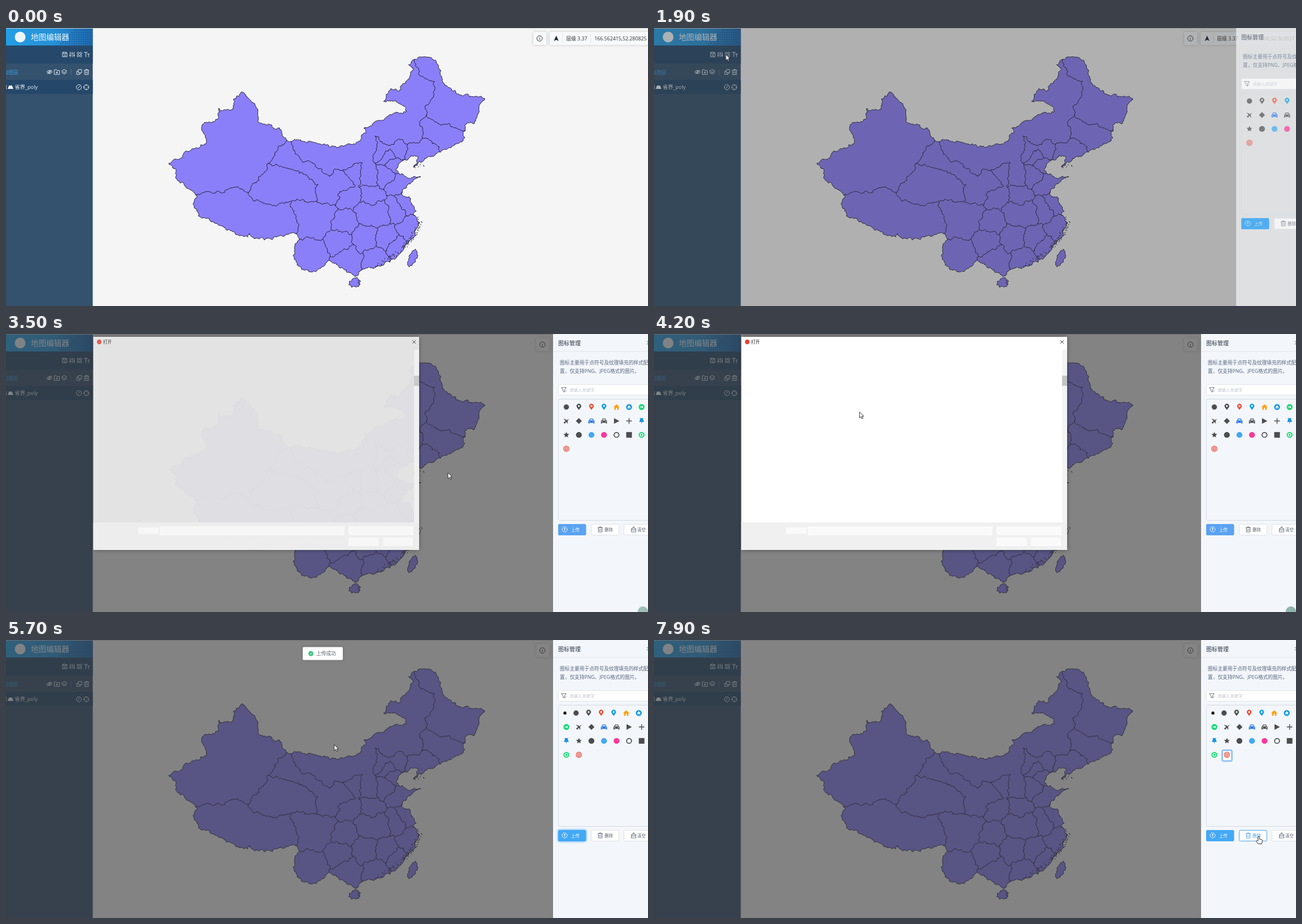
These frames come from a looping animation (1136x493 px, 8000 ms). An HTML page with a canvas:

```html
<!DOCTYPE html>
<html lang="zh">
<head>
<meta charset="utf-8">
<title>地图编辑器</title>
<style>
html, body { margin: 0; width: 100%; height: 100%; overflow: hidden; background: #f5f5f5; }
canvas { display: block; }
</style>
</head>
<body>
<canvas id="stage" width="1136" height="493"></canvas>
<script>
const c = document.getElementById('stage').getContext('2d');
const FONT = '"Open Sans", "Noto Sans CJK SC", "Noto Sans CJK", sans-serif';
const LOOP = 8000;
const ramp = (t, a, b) => Math.max(0, Math.min(1, (t - a) / (b - a)));

// ---- drawing helpers ----
function text(s, x, y, size, color, align = 'left') {
  c.font = `${size}px ${FONT}`;
  c.textAlign = align;
  c.fillStyle = color;
  c.fillText(s, x, y + size * .36);
}
function rect(x, y, w, h, fill, line, r = 0) {
  c.beginPath();
  c.roundRect(x, y, w, h, r);
  if (fill) { c.fillStyle = fill; c.fill(); }
  if (line) { c.strokeStyle = line; c.lineWidth = 1; c.stroke(); }
}
function shadowed(blur, color, draw) {
  c.save();
  c.shadowBlur = blur;
  c.shadowColor = color;
  draw();
  c.restore();
}
function icon(x, y, d, color, width) {
  c.save();
  c.translate(x, y);
  const p = new Path2D(d);
  if (width) { c.strokeStyle = color; c.lineWidth = width; c.stroke(p); }
  else { c.fillStyle = color; c.fill(p, 'evenodd'); }
  c.restore();
}
const ring = (r, x = 0, y = 0) => `M${x + r} ${y}A${r} ${r} 0 1 1 ${x - r} ${y}A${r} ${r} 0 1 1 ${x + r} ${y}Z`;
const rings = (...radii) => radii.map(r => ring(r)).join('');
const cross = 'M-3-3L3 3M3-3L-3 3';
const star = (n, a, b) => 'M' + Array.from({ length: 2 * n }, (_, i) => {
  const r = i % 2 ? b : a, w = i * Math.PI / n;
  return `${r * Math.sin(w)} ${-r * Math.cos(w)}`;
}).join('L') + 'Z';

// ---- map ----
let seed = 7;
const rand = () => (seed = (seed * 16807) % 2147483647) / 2147483647;
const jitter = r => (rand() - .5) * 2 * r;
const points = s => s.trim().split(/\s*,\s*/).map(p => p.split(/\s+/).map(Number));

// Roughens a coarse polyline by midpoint displacement.
function rough(line) {
  const out = [line[0]];
  const split = ([ax, ay], [bx, by]) => {
    const d = Math.hypot(bx - ax, by - ay);
    if (d < 2.5) { out.push([bx, by]); return; }
    const k = jitter(Math.min(.27 * d, 3.5)) / d;
    const mid = [(ax + bx) / 2 + (by - ay) * k, (ay + by) / 2 - (bx - ax) * k];
    split([ax, ay], mid);
    split(mid, [bx, by]);
  };
  for (let i = 1; i < line.length; i++) split(line[i - 1], line[i]);
  return 'M' + out.map(p => p.map(v => v.toFixed(1)).join(' ')).join('L');
}
function island(x, y, rx, ry, tilt) {
  const loop = Array.from({ length: 9 }, (_, i) => {
    const w = i * Math.PI / 4, u = rx * Math.cos(w), v = ry * Math.sin(w);
    return [x + u * Math.cos(tilt) - v * Math.sin(tilt), y + u * Math.sin(tilt) + v * Math.cos(tilt)];
  });
  return rough(loop) + 'Z';
}
const outline = points(`288 240, 322 219, 354 205, 347 172, 369 166, 377 142, 400 145, 402 127, 415 115, 443 142,
  447 167, 466 171, 484 177, 497 199, 545 203, 573 212, 623 202, 637 186, 633 178, 682 154, 709 148, 695 134,
  668 130, 681 107, 697 111, 722 73, 712 65, 742 51, 760 57, 774 97, 805 119, 847 125, 828 170, 812 172, 812 195,
  771 217, 721 247, 729 228, 716 226, 694 241, 690 252, 707 263, 734 264, 700 293, 713 299, 726 325, 720 331,
  732 346, 712 382, 687 410, 655 424, 624 433, 618 441, 590 425, 574 413, 543 432, 523 428, 508 404, 519 376,
  508 362, 457 376, 431 364, 428 371, 386 354, 357 337, 346 337, 333 317, 338 297, 300 265, 301 251, 288 240`);

// Each province is a union of Voronoi cells around its sites.
const sites = `377 242, 463 206, 427 240/395 330, 466 347, 495 340/480 282, 490 262, 530 285/497 234, 548 254, 572 290
  /536 212, 556 243, 605 236, 640 215, 680 190, 718 188, 715 150, 733 108, 715 78/748 68, 778 115, 772 146, 805 155
  /752 182, 785 195/722 222, 737 217/664 216, 695 218, 672 260/677 230/685 243/640 262/614 258, 606 300/597 272
  /693 275/645 300/687 322/709 308/714 358/694 388/676 373/640 325, 660 328/636 372/655 412/605 408/590 378
  /597 345/530 330, 565 335, 543 350/543 398`
  .split('/').flatMap((group, id) => points(group).map(([x, y]) => ({ x, y, id })));

// The part of the bisector of a and b that no other site is nearer to.
function edge(a, b) {
  const mx = (a.x + b.x) / 2, my = (a.y + b.y) / 2, dx = a.y - b.y, dy = b.x - a.x;
  let lo = -3, hi = 3;
  for (const s of sites) {
    if (s === a || s === b) continue;
    const sx = s.x - a.x, sy = s.y - a.y;
    const slope = 2 * (dx * sx + dy * sy);
    const limit = (s.x ** 2 + s.y ** 2 - a.x ** 2 - a.y ** 2 - 2 * (mx * sx + my * sy)) / slope;
    if (slope > 0) hi = Math.min(hi, limit); else lo = Math.max(lo, limit);
  }
  return lo < hi ? rough([lo, hi].map(k => [mx + dx * k, my + dy * k])) : '';
}
const land = new Path2D(rough(outline) + 'Z' + island(719, 408, 6, 17, .35) + island(617, 452, 11, 8, -.3));
const borders = new Path2D(sites.flatMap((a, i) =>
  sites.slice(i + 1).filter(b => b.id !== a.id).map(b => edge(a, b))).join(''));

// Small islands follow the south-east coast as a curve.
const isles = Array.from({ length: 90 }, () => {
  const u = rand(), v = 1 - u;
  return [v * v * 732 + 2 * u * v * 722 + u * u * 652 + jitter(4), v * v * 338 + 2 * u * v * 387 + u * u * 423 + jitter(4)];
});
for (let i = 0; i < 10; i++) isles.push([730 + jitter(9), 243 + jitter(5)]);

function drawMap() {
  c.fillStyle = '#8b7ff9';
  c.fill(land);
  c.strokeStyle = c.lineWidth = '#15131f';
  c.lineWidth = .9;
  c.stroke(land);
  c.save();
  c.clip(land);
  c.stroke(borders);
  c.restore();
  c.fillStyle = '#15131f';
  for (const [x, y] of isles) c.fillRect(x, y, 1.3, 1.3);
}

// ---- sidebar ----
const trash = 'M-4.5-3H4.5M-1.5-3V-4.5H1.5V-3M-3.3-3V4.5H3.3V-3M-1.2-.8V2.5M1.2-.8V2.5';
const save = 'M-4-4H3L4-3V4H-4ZM-2-4V-1H2V-4M-2 2H2';
const sliders = 'M-3.5-4.5V4.5M0-4.5V4.5M3.5-4.5V4.5M-5 1.5H-2M-1.5-2H1.5M2 1.5H5';
const grid = [-2.4, 2.4].map(x => ring(1.7, x, -2.4) + ring(1.7, x, 2.4)).join('');
const letters = 'M-5-3.8H1.5M-1.8-3.8V4.5M.8-.8H5M3-.8V4.5';
const hide = 'M-5 0Q0-6 5 0Q0 6-5 0ZM-4 3.5L4-3.5' + ring(1.5);
const folder = 'M-4.5-4H-1L0-2.6H4.5V4.3H-4.5ZM-2 1H2M0-1V3';
const layers = 'M0-4.5L4.7-1.7 0 1-4.7-1.7ZM-4.7.8L0 3.6 4.7.8';
const copy = 'M-1.5-4.3H4.3V1.5H-1.5ZM-1.5-1.5H-4.3V4.3H1.5V1.5';
const edit = ring(4.5) + 'M-2 2L2-2.5';
const locate = ring(4.5) + 'M0-4.5V-2M0 4.5V2M-4.5 0H-2M4.5 0H2';
const iconRow = (x, y, list) => list.forEach((d, i) => icon(x + 13 * i, y, d, '#dde6ee', 1));

function drawSidebar() {
  rect(0, 0, 153.5, 493, '#34516e');
  const g = c.createLinearGradient(0, 0, 154, 0);
  g.addColorStop(0, '#249fe6');
  g.addColorStop(.55, '#2690d6');
  g.addColorStop(1, '#1e68ac');
  rect(0, 0, 153.5, 31, g);
  c.fillStyle = 'rgba(15,60,125,.4)';
  for (let x = 96; x < 152; x += 4) for (let y = 3; y < 30; y += 4)
    if (x + y > 122) c.fillRect(x, y, 2, 2);
  rect(0, 31, 153.5, 32, '#26496b');
  rect(0, 92, 153.5, 25, '#25486a');
  icon(25, 16, ring(9.5), '#eef6fc');
  text('地图编辑器', 44, 16, 13.6, '#f2f8fd');
  text('加图层', 22, 78.5, 8.7, '#369be4', 'right');
  rect(114.5, 73, 1, 10, '#5b748c');
  iconRow(104, 47, [save, sliders, grid, letters]);
  iconRow(77, 78, [hide, folder, layers]);
  iconRow(129.5, 78, [copy, trash]);
  iconRow(129, 105, [edit, locate]);
  icon(8, 105, 'M-2.6-3H2.6L5 3H-5Z', '#f2f5f8');
  rect(0, 101, .8, 8, '#c5d0da');
  text('省界_poly', 15.5, 105, 9.2, '#eef3f7');
}

// ---- pointer ----
const start = { x: 1134, y: 69 };
const moves = [
  { from: 300, to: 1000, x: 160, y: 67.764 },
  { from: 1000, to: 1600, x: 127, y: 47 },
  { from: 1900, to: 2600, x: 954, y: 324 },
  { from: 2700, to: 2900, x: 990, y: 343 },
  { from: 3100, to: 3500, x: 782, y: 246 },
  { from: 3500, to: 4300, x: 304, y: 123 },
  { from: 5400, to: 6200, x: 1042, y: 290 },
  { from: 6200, to: 6600, x: 1011, y: 206 },
  { from: 7200, to: 7700, x: 1070, y: 348 },
];
const pointer = t => moves.reduce((p, m) => {
  const u = ramp(t, m.from, m.to);
  return { x: p.x + (m.x - p.x) * u, y: p.y + (m.y - p.y) * u };
}, start);
const arrow = 'M0 0V10.5L2.5 8.2 4.2 12 6 11.2 4.3 7.6H7.6Z';
const hand = 'M-1.2 1Q0-.6 1.2 1V5L5 5.8Q6.6 6.2 6.5 8L5.5 13.5H-1L-4.3 8.5Q-3.2 6.5-1.2 8.2Z';
function drawPointer(t) {
  if (t < 300) return;
  const { x, y } = pointer(t);
  const isHand = (t >= 2900 && t < 3200) || (t >= 4600 && t < 5400) || t >= 6500;
  const d = isHand ? hand : arrow;
  icon(x, y, d, '#fff');
  icon(x, y, d, '#1b1b1b', .9);
}

// ---- status bar ----
const mercator = lat => Math.log(Math.tan(Math.PI / 4 + lat * Math.PI / 360));
function coords(t) {
  const { x, y } = pointer(Math.min(t, 1000));
  const lng = 166.562415 + (x - start.x) / 9.09;
  const lat = Math.atan(Math.exp(mercator(52.280825) + (start.y - y) / 520.8)) * 360 / Math.PI - 90;
  return `${lng.toFixed(6)},${lat.toFixed(6)}`;
}
function drawStatus(t) {
  const s = coords(t);
  c.font = `8.8px ${FONT}`;
  const x = 1133.5 - c.measureText(s).width;
  shadowed(4, 'rgba(0,0,0,.22)', () => {
    rect(x - 108, 7, 23, 23, '#f8f9fb', null, 2);
    rect(x - 79, 7, 200, 23, '#f8f9fb', null, 2);
  });
  icon(x - 97, 18.5, ring(4.8) + 'M.6-2.8L.4-1.8M.2-.8L-.4 2.6', '#333', 1);
  icon(x - 67.5, 18.5, 'M0-5L4.2 4.5 0 2.6-4.2 4.5Z', '#1c2530');
  for (const gap of [57, 7]) rect(x - gap, 9, 1, 18, '#e3e6ea');
  text('层级 3.37', x - 50, 18.5, 8.8, '#333');
  text(s, x, 18.5, 8.8, '#333');
}

// ---- drawer ----
const pin = 'M0 5.2L-3.4.6A4.1 4.1 0 1 1 3.4.6Z' + ring(1.7, 0, -1.7);
const car = 'M-5.3-.5L-4-1-2.8-4.2H2.8L4-1 5.3-.5V4.6H3.4V3.2H-3.4V4.6H-5.3ZM-2.8-1H2.8L2-3H-2Z' + ring(.8, -3.2, 1.2) + ring(.8, 3.2, 1.2);
const house = 'M0-5L5.5 0H4V5H1.2V1.5H-1.2V5H-4V0H-5.5Z';
const smallHouse = ring(5.2) + 'M0-3.2L3.2.2H2.2V3H.8V1H-.8V3H-2.2V.2H-3.2Z';
const next = ring(5.2) + 'M-3-.7H.4V-2.6L3.3 0 .4 2.6V.7H-3Z';
const plane = 'M-5-4.5L1-1.5 5-4 2 0 3 5-.5 1.5-2.5 5-5 2.5-1.5.3Z';
const plus = 'M-5-.7H-.7V-5H.7V-.7H5V.7H.7V5H-.7V.7H-5Z';
const pushpin = 'M-3.2-5H3.2V-3.8H2.2L4.2 1.8H.6L0 5.5-.6 1.8H-4.2L-2.2-3.8H-3.2Z';
const dark = '#4b4d50', green = '#12db72';
const symbols = [
  [star(10, 5.2, 4.2), dark], [pin, dark], [pin, '#f2513a'], [pin, '#0a9fec'],
  [house, '#fba31c'], [smallHouse, '#0d95e0'], [next, green],
  [plane, dark], [star(2, 5.3, 5.3), dark], [car, '#1e72e8'], [car, dark],
  ['M-4.5-5L5 0-4.5 5Z', dark], [plus, dark], [pushpin, '#1792df'],
  [star(5, 5.4, 2.5), dark], [ring(5.2), dark], [ring(5.2), '#42a9f4'], [ring(5.2), '#fa3898'],
  [rings(5.2, 3.5), dark], ['M-5-5H5V5H-5Z', dark], [rings(5.2, 3.2, 1.8), green],
  [rings(5.3, 4.2, 3.1, 2, 1), '#ea4634'],
];
const added = ['M-2.5-2H-1V-2.8H1V-2H2.5V2.5H-2.5Z', '#111'];

function button(x, label, d, fill, line, color) {
  rect(x + .5, 337.5, 49, 19, fill, line, 2);
  icon(x + 11.5 + (label === '删除' ? 5 : 0) + (label === '清空' ? 6 : 0), 346.5, d, color, .9);
  text(label, x + (label === '上传' ? 23 : 24), 347, 7.5, color);
}
function drawSymbols(t) {
  if (t >= 7200) shadowed(2, '#57a5f5', () => rect(1005.5, 195.5, 17, 19, '#fff', '#4d9bf0', 1));
  else if (t >= 6600) rect(1005.5, 195.5, 17, 19, '#eceff2', '#a9aeb4', 1);
  const uploaded = t >= 5500;
  (uploaded ? [added, ...symbols] : symbols).forEach(([d, color], i) => {
    // The uploaded symbol is narrower, so the rest of its row moves left.
    const shift = uploaded && i < 7 ? (i ? 5 : 2.5) : 0;
    icon(991.5 + 22.2 * (i % 7) - shift, 129.5 + 24.7 * Math.floor(i / 7), d, color);
  });
}
function drawDrawer(t, p) {
  c.save();
  c.globalAlpha = p ** .75;
  c.translate((1 - p) * 159, 0);
  rect(968, 0, 400, 493, '#f3f6fa');
  rect(968, 30.5, 400, 1, '#e3e8ee');
  text('图标管理', 977, 16, 10, '#2a3444');
  icon(1137, 15.5, cross, '#555', 1);
  text('图标主要用于点符号及纹理填充的样式配', 980, 51, 8.7, '#56657f');
  text('置，仅支持PNG、JPEG格式的图片。', 980, 66, 8.7, '#56657f');
  rect(977.5, 89.5, 300, 19, '#fff', '#dfe5eb', 2);
  icon(987, 99, 'M-4.5-4H4.5L1.3 0V4L-1.3 2.6V0ZM2.5 2H4.5', '#5a6270', .9);
  text('请输入关键字', 997, 99.5, 7.4, '#bcc3cc');
  rect(977.5, 115.5, 300, 215, null, '#d3dbe3', 2);
  drawSymbols(t);

  const pressed = t >= 2900 && t < 5500, focus = t >= 5500 && t < 7100;
  const blue = pressed ? '#5aa3f1' : '#43a9f4';
  shadowed(focus ? 4 : 0, '#409eff', () => rect(977, 337, 49, 20, blue, null, 2));
  button(977, '上传', ring(4.5) + 'M0 2.5V-2.3M-2-.4L0-2.4 2-.4', blue, null, '#fff');
  const hot = t >= 7600 && '#4ba3ee';
  button(1035, '删除', trash, '#fff', hot || '#dce2e9', hot || '#596270');
  button(1093, '清空', 'M-1-4.5H1V-1.5H4V.8H-4V-1.5H-1ZM-3.5.8L-4.2 4.5H4.2L3.5.8', '#fff', '#dce2e9', '#596270');
  c.restore();
}

// ---- file dialog ----
function drawDialog(a) {
  c.save();
  c.globalAlpha = a;
  shadowed(7, 'rgba(0,0,0,.45)', () => rect(154.5, 5, 576.5, 378, '#fff'));
  rect(154.5, 334, 576.5, 49, '#f0f0f0');
  rect(722, 28, 9, 306, '#f3f3f3');
  rect(722, 74, 9, 18, '#c4c4c4');
  const field = (x, y, w, h) => rect(x, y, w, h, '#fafafa');
  field(234, 343, 36, 11.5);
  field(272, 341, 327, 16);
  field(606, 341, 115, 16);
  field(606, 361, 54, 15);
  field(667, 361, 53, 15);
  icon(165, 14, ring(4.2), '#dc4a3c');
  text('打开', 172, 14, 7.5, '#111');
  icon(722, 14, cross, '#222', .9);
  icon(1127, 492, ring(9), '#8fb5ac');
  c.restore();
}

// ---- success message ----
function drawToast(t) {
  const enter = ramp(t, 5400, 5700), leave = ramp(t, 6620, 6820);
  c.save();
  c.globalAlpha = enter * (1 - leave);
  c.translate(0, 24 - 38 * (1 - enter + leave));
  shadowed(4, 'rgba(0,0,0,.2)', () => rect(525, -11.5, 71, 23, '#fff', null, 2));
  icon(539.5, 0, ring(4.5), '#3fc380');
  icon(539.5, 0, 'M-2 0L-.5 1.6 2.2-1.4', '#fff', 1);
  text('上传成功', 549, 0, 8.7, '#606266');
  c.restore();
}

function draw(t) {
  const p = 1 - (1 - ramp(t, 1750, 2150)) ** 2;
  rect(0, 0, 1136, 493, '#f5f5f5');
  drawMap();
  drawStatus(t);
  drawSidebar();
  rect(0, 0, 1136, 1, '#c6c6c6');
  rect(0, 0, 1136, 493, `rgba(55,55,55,${.6 * p})`);
  drawDrawer(t, p);
  drawToast(t);
  drawDialog(ramp(t, 3395, 3520) * (1 - ramp(t, 4480, 4650)));
  drawPointer(t);
}

// The screen advances in steps of 100 ms.
function tick() {
  draw(Math.floor(performance.now() % LOOP / 100) * 100);
  requestAnimationFrame(tick);
}
tick();
</script>
</body>
</html>
```
